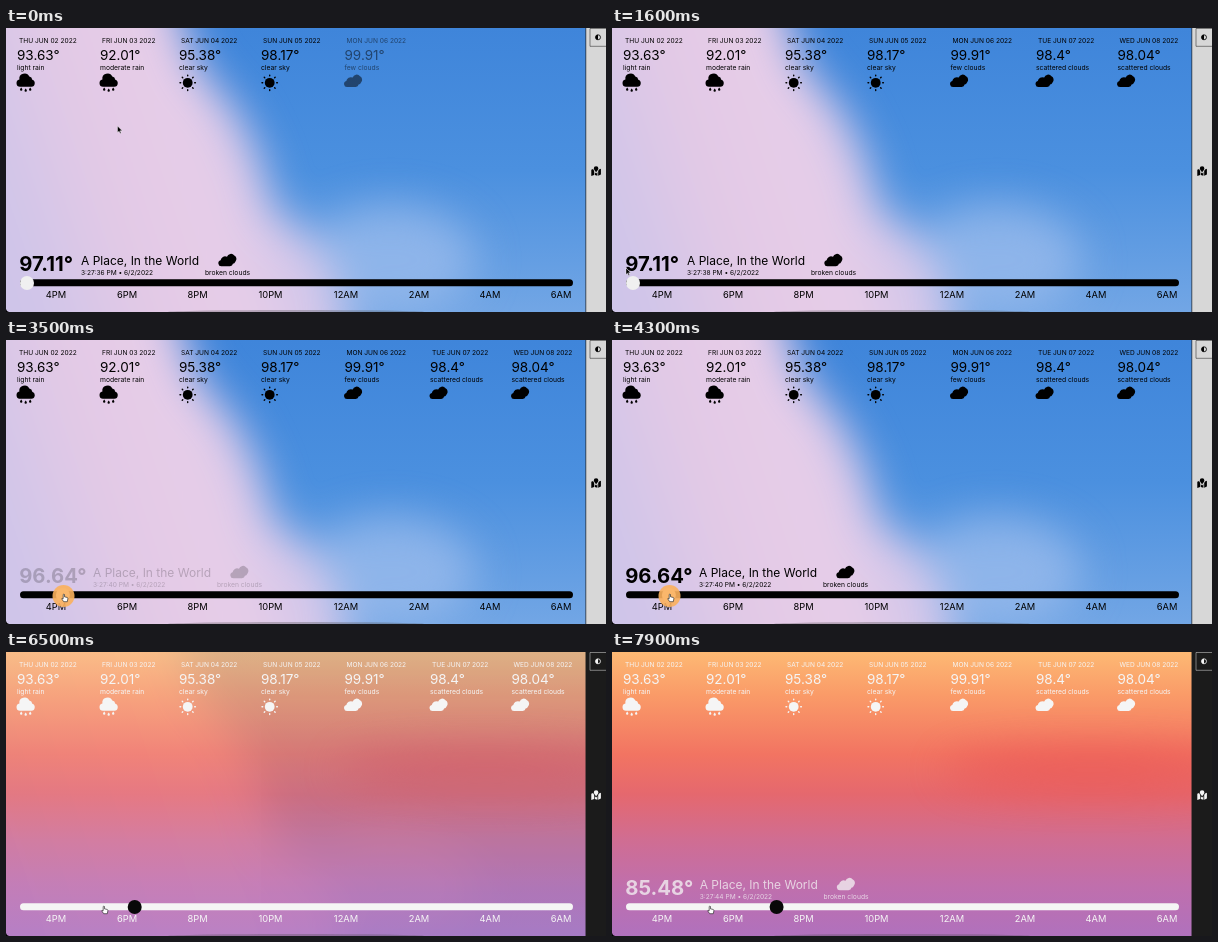
Write an HTML page that moves like this. It is 600 by 284 pixels and loops after 8000 ms.

```html
<!DOCTYPE html>
<html lang="en">
<head>
<meta charset="utf-8">
<title>Weather</title>
<style>
html, body { margin: 0; width: 100%; height: 100%; overflow: hidden; }
svg { display: block; width: 100%; height: 100%; font-family: Inter, Roboto, sans-serif; }
text { fill: currentColor; white-space: pre; }
.small { font-size: 6.6px; }
.sky { font-size: 6.75px; }
.temp { font-size: 13.5px; }
.big { font-size: 20.3px; font-weight: 700; }
.place { font-size: 12px; }
.hour { font-size: 9.3px; text-anchor: middle; }
.mid { text-anchor: middle; }
.icon { fill: currentColor; stroke: currentColor; stroke-width: 0; }
</style>
</head>
<body>
<svg viewBox="0 0 600 284" preserveAspectRatio="none">
  <defs>
    <linearGradient id="blue" x2="0" y2="1">
      <stop stop-color="#3f85da"/><stop offset=".5" stop-color="#4b90df"/><stop offset="1" stop-color="#72a6e5"/>
    </linearGradient>
    <linearGradient id="pink" gradientUnits="userSpaceOnUse" x1="0" y1="190" x2="270" y2="100">
      <stop stop-color="#cfc5e9"/><stop offset=".35" stop-color="#e2c9e6"/><stop offset=".7" stop-color="#e7cde8"/><stop offset="1" stop-color="#cdc5ea"/>
    </linearGradient>
    <linearGradient id="dusk" x2="0" y2="1">
      <stop stop-color="#fdb974"/><stop offset=".15" stop-color="#fa9b68"/><stop offset=".36" stop-color="#f27462"/>
      <stop offset=".5" stop-color="#e5686e"/><stop offset=".66" stop-color="#d06d92"/><stop offset=".82" stop-color="#c06fac"/><stop offset="1" stop-color="#b071bd"/>
    </linearGradient>
    <filter id="soft" filterUnits="userSpaceOnUse" x="-100" y="-100" width="800" height="484" color-interpolation-filters="sRGB"><feGaussianBlur stdDeviation="21"/></filter>
    <clipPath id="stage"><path d="M0 0H580V284H0Z"/></clipPath>

    <g id="rain">
      <path d="M-5.7 4a3.7 3.7 0 0 1-.6-7.3A5.2 5.2 0 0 1 3.6-6.2A3.8 3.8 0 0 1 6.6-3A3.6 3.6 0 0 1 5.7 4Z"/>
      <path d="M-4.5 4.6q2.4 3 0 3.4-2.4-.4 0-3.4M0 5.6q2.4 3 0 3.4-2.4-.4 0-3.4M4.5 4.6q2.4 3 0 3.4-2.4-.4 0-3.4"/>
    </g>
    <path id="clouds" d="M-6 4.2a3 3 0 0 1-.9-5.9A4.5 4.5 0 0 1-.5-5.2A4.2 4.2 0 0 1 6.8-6.6A3.9 3.9 0 0 1 8-.6Q7 1.5 5.4 1.8Q5 4.2 2.5 4.2Z"/>
    <g id="sun"><circle r="4.9"/><path id="rays" fill="none" stroke-width="1.4" stroke-linecap="round"/></g>
  </defs>

  <g clip-path="url(#stage)">
    <path d="M0 0H580V284H0Z" fill="url(#blue)"/>
    <g filter="url(#soft)">
      <ellipse cx="385" cy="232" rx="85" ry="55" fill="#9dbcec" opacity=".75"/>
      <path d="M-60-60H160L190 35 232 85 256 135 266 180 305 210 330 245 350 340H-60Z" fill="url(#pink)"/>
    </g>
    <g id="evening">
      <path d="M0 0H580V284H0Z" fill="url(#dusk)"/>
      <ellipse cx="480" cy="118" rx="150" ry="20" fill="#ea5353" opacity=".7" filter="url(#soft)"/>
    </g>
    <ellipse cx="290" cy="284" rx="128" ry="2" fill="#444" opacity=".3"/>
    <path d="M0 281V284H3Q.5 283.5 0 281Z"/>
  </g>

  <g id="ui">
    <g id="cards"></g>
    <g id="now">
      <text class="big" id="degrees" x="13.2" y="243.3"></text>
      <g id="details">
        <text class="place" y="237.3">A Place, In the World</text>
        <text class="small" id="clock" y="246.5"></text>
        <use class="icon" id="sky"/>
        <text class="sky mid" id="skyText" y="246.5"></text>
      </g>
    </g>
    <rect x="14" y="251.3" width="553" height="7" rx="3.5" fill="currentColor"/>
    <circle id="thumb" cy="255" r="7"/>
    <g id="hours"></g>

    <path id="bar" d="M580 0H600V284H580Z"/>
    <path d="M579.8 0V284" stroke="#222" stroke-width=".7"/>
    <path d="M601 .5H584V18.3H601" fill="none" stroke="currentColor" stroke-width=".6" opacity=".75"/>
    <circle cx="592" cy="9.3" r="2.5" fill="none" stroke="currentColor" stroke-width=".8"/>
    <path d="M592 6.8a2.5 2.5 0 0 0 0 5Z" fill="currentColor"/>
    <path d="M585.3 141.8l1.8-.8 1 2v4l-2.8 1ZM588.8 144.2l1.3 1.2 1.3-1.2v3.6l-2.6-.8ZM592.2 143l.8-1.6 1.9-.7v5.8l-2.7 1.3ZM590.1 144.2q-2.3-2.6-2.3-3.7a2.3 2.3 0 0 1 4.6 0q0 1.1-2.3 3.7Z" fill="currentColor"/>
  </g>

  <circle id="press" cy="256" r="11" fill="#fbb05c"/>
  <path id="arrow" d="M0 0V6.5L1.6 5.2 2.6 7.5 3.6 7 2.6 4.8H4.7Z" stroke="#fff" stroke-width=".4"/>
  <path id="hand" d="M-1.3-3.5q.7-.8 1.3 0v2.3l2.8.7q.7.3.6 1.2l-.6 3h-3.6l-2-2.9q.1-.9 1.5-.1Z" fill="#fff" stroke="#111" stroke-width=".6"/>
</svg>

<script>
const $ = id => document.getElementById(id);
const clamp = v => Math.max(0, Math.min(1, v));
const ramp = (t, start, length) => clamp((t - start) / length);
const ease = p => p * p * (3 - 2 * p);
const glide = (t, a, b, start, length) => a + (b - a) * ease(ramp(t, start, length));
const grey = v => `rgb(${v},${v},${v})`;

const days = [
  [11, "THU JUN 02", "93.63", "light rain", "rain"],
  [94, "FRI JUN 03", "92.01", "moderate rain", "rain"],
  [173, "SAT JUN 04", "95.38", "clear sky", "sun"],
  [255, "SUN JUN 05", "98.17", "clear sky", "sun"],
  [338.5, "MON JUN 06", "99.91", "few clouds", "clouds"],
  [424, "TUE JUN 07", "98.4", "scattered clouds", "clouds"],
  [505.5, "WED JUN 08", "98.04", "scattered clouds", "clouds"]
];
const hours = { "4PM": 50, "6PM": 121, "8PM": 191.5, "10PM": 264.5, "12AM": 340, "2AM": 413, "4AM": 484, "6AM": 555 };

// One entry per slider stop: start time, degrees, sky, icon, left edge, sky centre
const stops = [
  [-2000, "97.11", "broken clouds", "clouds", 75, 221.5],
  [3000, "96.64", "broken clouds", "clouds", 87, 233.5],
  [4800, "92.05", "light rain", "rain", 87, 225],
  [6200, "88.70", "broken clouds", "clouds", 87, 233.5],
  [7125, "85.48", "broken clouds", "clouds", 87.7, 234]
];

$("rays").setAttribute("d", Array.from({ length: 8 }, (_, i) => {
  const x = Math.cos(i * Math.PI / 4), y = Math.sin(i * Math.PI / 4);
  return `M${7 * x} ${7 * y}L${7.7 * x} ${7.7 * y}`;
}).join(""));

$("cards").innerHTML = days.map(([x, date, temp, sky, icon]) => `<g>
  <text class="small" x="${x + 2}" y="15">${date} 2022</text>
  <text class="temp" x="${x}" y="32">${temp}°</text>
  <text class="sky" x="${x}" y="42">${sky}</text>
  <use class="icon" href="#${icon}" x="${x + 8.7}" y="54.8"/></g>`).join("");
$("hours").innerHTML = Object.entries(hours)
  .map(([label, x]) => `<text class="hour" x="${x}" y="270">${label}</text>`).join("");

const lines = $("details").querySelectorAll(".place, #clock");

function place(id, x, y, opacity) {
  $(id).setAttribute("transform", `translate(${x} ${y})`);
  $(id).style.opacity = opacity;
}

function drawNow(t) {
  const current = stops.findLastIndex(s => t >= s[0]);
  const age = t - stops[current][0];
  const leaving = current > 0 && age < 250;
  const [, degrees, sky, icon, left, centre] = stops[leaving ? current - 1 : current];
  $("now").style.opacity = leaving ? 1 - age / 250 : ramp(age, 400, 500);
  $("degrees").textContent = degrees + "°";
  $("clock").textContent = `3:27:${36 + Math.floor((t + 550) / 1000)} PM • 6/2/2022`;
  lines.forEach(line => line.setAttribute("x", left));
  $("sky").setAttribute("href", "#" + icon);
  $("sky").setAttribute("x", centre);
  $("sky").setAttribute("y", icon === "rain" ? 230 : 234);
  $("skyText").setAttribute("x", centre);
  $("skyText").textContent = sky;
  $("thumb").setAttribute("cx", 21 + 35.9 * current);
}

function drawPointer(t) {
  const onSlider = t >= 2200;
  const x = t < 4400 ? glide(t, 27, 58, 2700, 700) : glide(t, 58, 98, 4400, 800);
  const settle = ramp(t, 1700, 500);
  place("arrow", glide(t, 111.5, 14, 500, 1000) + 12 * settle,
    glide(t, 98, 240, 500, 1000) + 13 * settle, onSlider ? 0 : 1);
  place("hand", x + .5, 258, onSlider ? 1 : 0);
  place("press", x - .5, 0, t >= 2500 && t < 6000 ? .9 : 0);
}

function draw(now) {
  const t = Math.floor(now % 8000 / 100) * 100;
  [...$("cards").children].forEach((card, i) => card.style.opacity = ramp(t, (i - 5) * 200, 400));
  $("evening").style.opacity = ramp(t, 6100, 480);
  const dark = ramp(t, 6150, 250);
  $("ui").style.color = grey(Math.round(245 * dark));
  $("thumb").style.fill = grey(Math.round(240 - 232 * dark));
  $("bar").style.fill = grey(Math.round(215 - 188 * dark));
  drawNow(t);
  drawPointer(t);
  requestAnimationFrame(draw);
}
requestAnimationFrame(draw);
</script>
</body>
</html>
```
